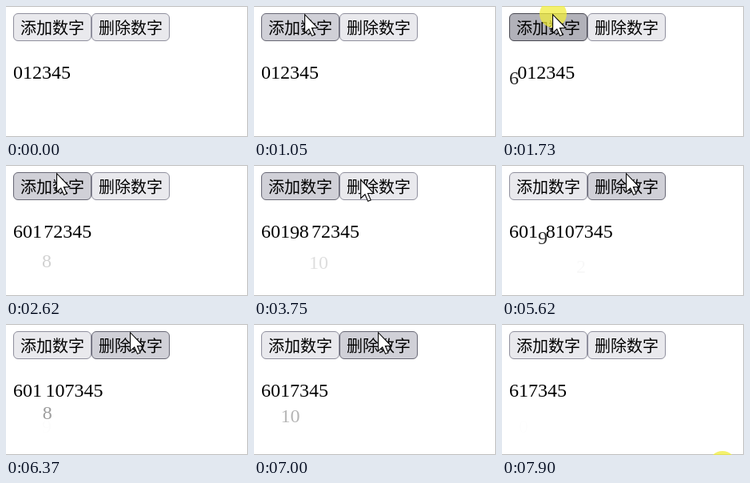
Recreate the animation shown at these times as an HTML page. Size 303 by 164 pixels, loop 7.96 s.

```html
<!DOCTYPE html>
<html lang="zh">
<head>
<meta charset="utf-8">
<title>列表动画</title>
<style>
html, body { margin: 0; width: 100%; height: 100%; overflow: hidden; background: #fff; }
svg { display: block; width: 303px; height: 164px; }
.button rect { fill: #e9e9ed; stroke: #8f8f9d; }
.button text { font: 20px "Noto Sans CJK SC", "Noto Sans CJK", sans-serif; }
.button.hover rect { fill: #d0d0d7; stroke: #676774; }
.button.active rect { fill: #b1b1b9; stroke: #484851; }
#digits { font: 24px "Liberation Serif", serif; }
#ring { fill: #f0ec3c; fill-opacity: .75; }
#arrow { fill: #fff; stroke: #000; stroke-width: .75; }
</style>
</head>
<body>
<svg viewBox="0 0 303 164">
  <g class="button" id="add">
    <rect x="9.5" y="9.5" width="97" height="34" rx="5.5"/>
    <text x="18" y="35">添加数字</text>
  </g>
  <g class="button" id="del">
    <rect x="107.5" y="9.5" width="97" height="34" rx="5.5"/>
    <text x="116" y="35">删除数字</text>
  </g>
  <g id="digits"></g>
  <path d="M0 .5H302.5V163.5H0" fill="none" stroke="#bdbdbd"/>
  <g id="pointer">
    <circle id="ring" cx="1" cy="0" r="17"/>
    <path id="arrow" transform="scale(1.45)" d="M.4 .5V16.4L4 13L6.6 18.9L9 17.9L6.5 12.1H11.6Z"/>
  </g>
</svg>
<script>
const LOOP = 7960, FADE = 1000, DROP = 45, PRESS = 95;
const $ = id => document.getElementById(id);

// time, number, insert position (none: remove)
const ops = [
  [1180, 6, 0], [1800, 7, 3], [2475, 8, 3], [2950, 9, 3], [3632, 10, 5],
  [4830, 2], [5475, 9], [6015, 8], [6580, 10], [6985, 0]
];

// time, x, y of the pointer tip
const path = [
  [0, 275, 180], [70, 250, 150], [400, 150, 72], [700, 84, 21], [840, 68, 12], [910, 63, 10],
  [3660, 63, 10], [3750, 133, 18], [3900, 155, 10],
  [7130, 155, 10], [7300, 220, 70], [7500, 289, 166], [7600, 275, 176], [LOOP, 275, 176]
];

const mix = (a, b, k) => a + (b - a) * k;

// cubic-bezier(.25, .1, .25, 1)
function ease(x) {
  if (x <= 0) return 0;
  if (x >= 1) return 1;
  let lo = 0, hi = 1;
  for (let i = 0; i < 24; i++) {
    const s = (lo + hi) / 2, r = 1 - s;
    if (.75 * r * r * s + .75 * r * s * s + s ** 3 < x) lo = s; else hi = s;
  }
  const s = lo, r = 1 - s;
  return .3 * r * r * s + 3 * r * s * s + s ** 3;
}

const tween = (from, to, start) => ({ from, to, start });
const read = (w, t) => {
  const k = ease((t - w.start) / FADE);
  return w.from.map((v, i) => mix(v, w.to[i], k));
};

const makeItem = n => ({
  n, left: 0, gone: false,
  shift: tween([0, 0], [0, 0], 0),
  alpha: tween([1], [1], 0)
});

// Removed items leave the flow but keep their place in the list.
function layout(list) {
  let x = 9;
  for (const item of list) {
    item.left = x;
    if (!item.gone) x += 12 * String(item.n).length;
  }
}

function apply(list, [t, n, index]) {
  const before = new Map(list.map(item => [item, item.left]));
  if (index === undefined) {
    const item = list.find(it => it.n === n);
    item.gone = true;
    item.shift = tween(read(item.shift, t), [0, DROP], t);
    item.alpha = tween(read(item.alpha, t), [0], t);
  } else {
    const item = makeItem(n);
    item.shift = tween([0, DROP], [0, 0], t);
    item.alpha = tween([0], [1], t);
    list.splice(index, 0, item);
  }
  layout(list);
  for (const [item, left] of before) {
    if (!item.gone && item.left !== left) item.shift = tween([left - item.left, 0], [0, 0], t);
  }
}

const labels = Array.from({ length: 11 }, (_, n) => {
  const el = document.createElementNS("http://www.w3.org/2000/svg", "text");
  el.textContent = n;
  $("digits").append(el);
  return el;
});

function drawDigits(t) {
  const list = [0, 1, 2, 3, 4, 5].map(makeItem);
  layout(list);
  ops.filter(op => op[0] <= t).forEach(op => apply(list, op));
  labels.forEach(el => el.setAttribute("opacity", 0));
  for (const item of list) {
    const [dx, dy] = read(item.shift, t), el = labels[item.n];
    el.setAttribute("transform", `translate(${item.left + dx} ${91 + dy})`);
    el.setAttribute("opacity", read(item.alpha, t)[0]);
  }
}

function drawPointer(t) {
  const i = path.findIndex(p => p[0] > t), a = path[i - 1], b = path[i];
  const k = (t - a[0]) / (b[0] - a[0]);
  $("pointer").setAttribute("transform", `translate(${mix(a[1], b[1], k)} ${mix(a[2], b[2], k)})`);
  const pressed = ops.some(op => t >= op[0] - PRESS && t < op[0]);
  $("ring").style.display = pressed || t > 7840 ? "" : "none";
  setState("add", t >= 760 && t < 3790, pressed);
  setState("del", t >= 3790 && t < 7220, pressed);
}

function setState(id, hover, pressed) {
  $(id).classList.toggle("hover", hover);
  $(id).classList.toggle("active", hover && pressed);
}

const began = performance.now();
function frame() {
  const t = (performance.now() - began) % LOOP;
  drawDigits(t);
  drawPointer(t);
  requestAnimationFrame(frame);
}
frame();
</script>
</body>
</html>
```
